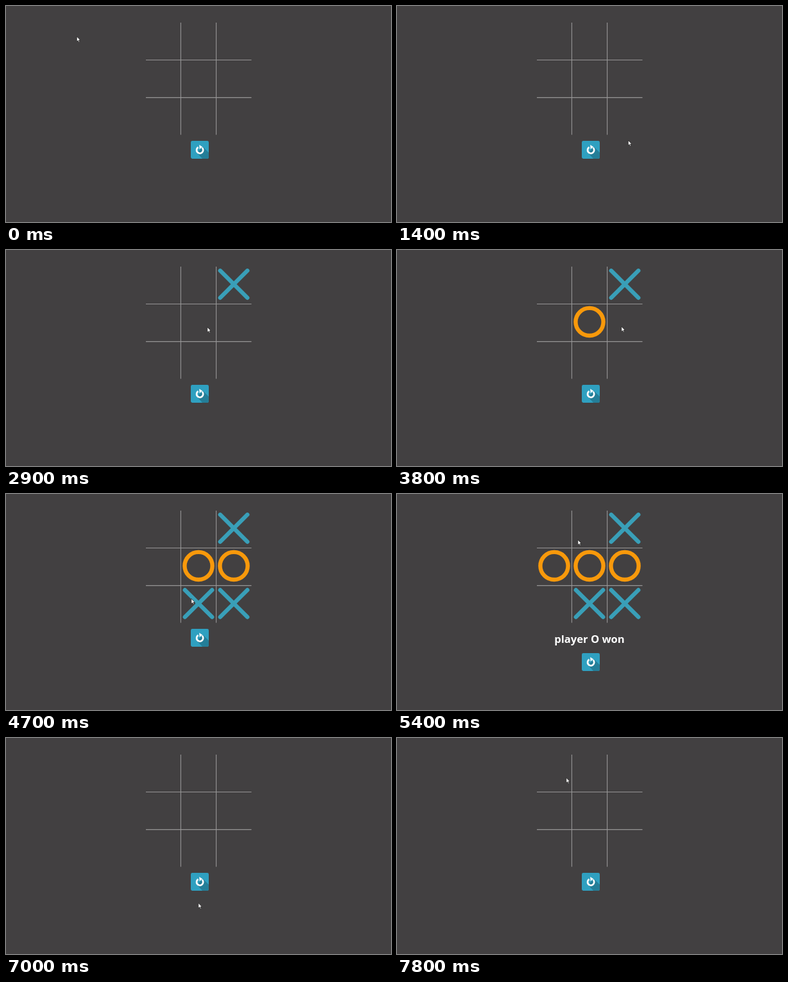
An HTML page for the animation above (8000 ms loop, 600x338 px).

```html
<!DOCTYPE html>
<html lang="en">
<head>
<meta charset="utf-8">
<title>Tic-tac-toe</title>
<style>
html, body { margin: 0; width: 100%; height: 100%; overflow: hidden; background: #424041; }
svg { display: block; width: 100vw; height: 100vh; }
text { font: bold 16.6px "Open Sans", "Noto Sans", sans-serif; fill: #fff; text-anchor: middle; }
.grid { stroke: #979696; stroke-width: 1.1; fill: none; }
.x { stroke: #399fb8; stroke-width: 6.4; stroke-linecap: round; fill: none; }
.o { stroke: #f8990b; stroke-width: 6.4; fill: none; }
.pointer { fill: #fff; stroke: #1c1b1b; stroke-width: .7; stroke-linejoin: round; }
</style>
</head>
<body>
<svg viewBox="0 0 600 338">
  <defs>
    <clipPath id="tile"><rect width="28" height="28" rx="2.4"/></clipPath>
  </defs>
  <rect width="600" height="338" fill="#424041"/>
  <path class="grid" d="M272.4 26V201.5M327.6 26V201.5M218 84.5H382.5M218 143.4H382.5"/>
  <g id="marks"></g>
  <text id="result" x="300" y="232.6">player O won</text>
  <g id="button">
    <g clip-path="url(#tile)">
      <rect width="28" height="28" fill="#2fa0c0"/>
      <path d="M19 9.5L28 18.5V28H18L9.6 18.6Z" fill="#247e98"/>
    </g>
    <path d="M11.6 10A5.1 5.1 0 1 0 17.6 10.7" fill="none" stroke="#fff" stroke-width="2.7"/>
    <path d="M13.2 6.2L18.2 9.5L13.6 13.1Z" fill="#fff"/>
  </g>
  <path id="arrow" class="pointer" d="M-.7 -.8V7.2L1.2 5.6L2.5 8.4L3.8 7.8L2.5 5.1H4.9Z"/>
  <path id="hand" class="pointer" d="M-1 .2Q0 -.8 1 .2V3.6L4.4 4.5Q5 4.8 5 5.6L4.3 9V11H-1V9.4L-3.3 6.2Q-3 5 -1.9 5.6L-1 6.4Z"/>
</svg>
<script>
const LOOP = 8000, STEP = 100;
const CELL_W = 55, CELL_H = 58.9, LEFT = 217.5, TOP = 24.1;
const BUTTON = { x: 288, size: 28, y: 211, wonY: 249 };

const $ = id => document.getElementById(id);
const show = (el, on) => el.setAttribute("visibility", on ? "visible" : "hidden");
const place = (el, x, y) => el.setAttribute("transform", `translate(${x} ${y})`);
const ease = k => k * k * (3 - 2 * k);

// The script of the game: the pointer glides, rests and clicks.
const glides = [], marks = [];
let clock = 0, spot = { x: 111, y: 48.5 };

function glide(ms, x, y) {
  glides.push({ start: clock, ms, from: spot, to: { x, y } });
  spot = { x, y };
  clock += ms;
}

function rest(ms) {
  clock += ms;
}

// Marks the cell under the pointer; players take turns.
function mark() {
  const kind = marks.length % 2 ? "o" : "x";
  const col = Math.floor((spot.x - LEFT) / CELL_W);
  const row = Math.floor((spot.y - TOP) / CELL_H);
  const el = document.createElementNS("http://www.w3.org/2000/svg", "path");
  el.setAttribute("class", kind);
  el.setAttribute("d", kind === "x"
    ? "M-21.2 -21.2L21.2 21.2M21.2 -21.2L-21.2 21.2"
    : "M-21.6 0A21.6 21.6 0 1 1 21.6 0A21.6 21.6 0 1 1 -21.6 0Z");
  place(el, LEFT + CELL_W * (col + .5), TOP + CELL_H * (row + .5));
  $("marks").append(el);
  marks.push({ at: clock, el });
}

glide(500, 231, 108);
rest(100);
glide(300, 314, 203);
rest(100);
glide(400, 361, 211);
rest(300);
glide(800, 354, 56);
mark();
glide(400, 314.5, 121.5);
rest(200);
mark();
rest(200);
glide(500, 350.5, 120.5);
glide(100, 352, 164);
mark();
rest(100);
glide(200, 350, 120);
mark();
glide(300, 289.5, 164.5);
rest(200);
mark();
rest(100);
glide(300, 248, 118);
mark();
const won = clock;
glide(400, 289, 64);
rest(200);
glide(700, 305.5, 268);
rest(300);
const reset = clock;
glide(300, 300.5, 259);
rest(400);
glide(400, 264.5, 63);

function pointerAt(t) {
  const g = glides.filter(g => g.start <= t).pop();
  const k = ease(Math.min(1, (t - g.start) / g.ms));
  return [g.from.x + (g.to.x - g.from.x) * k, g.from.y + (g.to.y - g.from.y) * k];
}

function draw(now) {
  const t = Math.floor(now % LOOP / STEP) * STEP;
  const [x, y] = pointerAt(t);
  const ended = t >= won && t < reset;
  const top = ended ? BUTTON.wonY : BUTTON.y;
  const inside = (v, min) => v > min && v < min + BUTTON.size;
  const over = inside(x, BUTTON.x) && inside(y, top);

  marks.forEach(m => show(m.el, t >= m.at && t < reset));
  show($("result"), ended);
  place($("button"), BUTTON.x, top);
  $("button").setAttribute("opacity", over ? .75 : 1);
  show($("arrow"), !over);
  show($("hand"), over);
  place($(over ? "hand" : "arrow"), x, y);
}

const start = performance.now();
function tick() {
  draw(performance.now() - start);
  requestAnimationFrame(tick);
}
tick();
</script>
</body>
</html>
```
